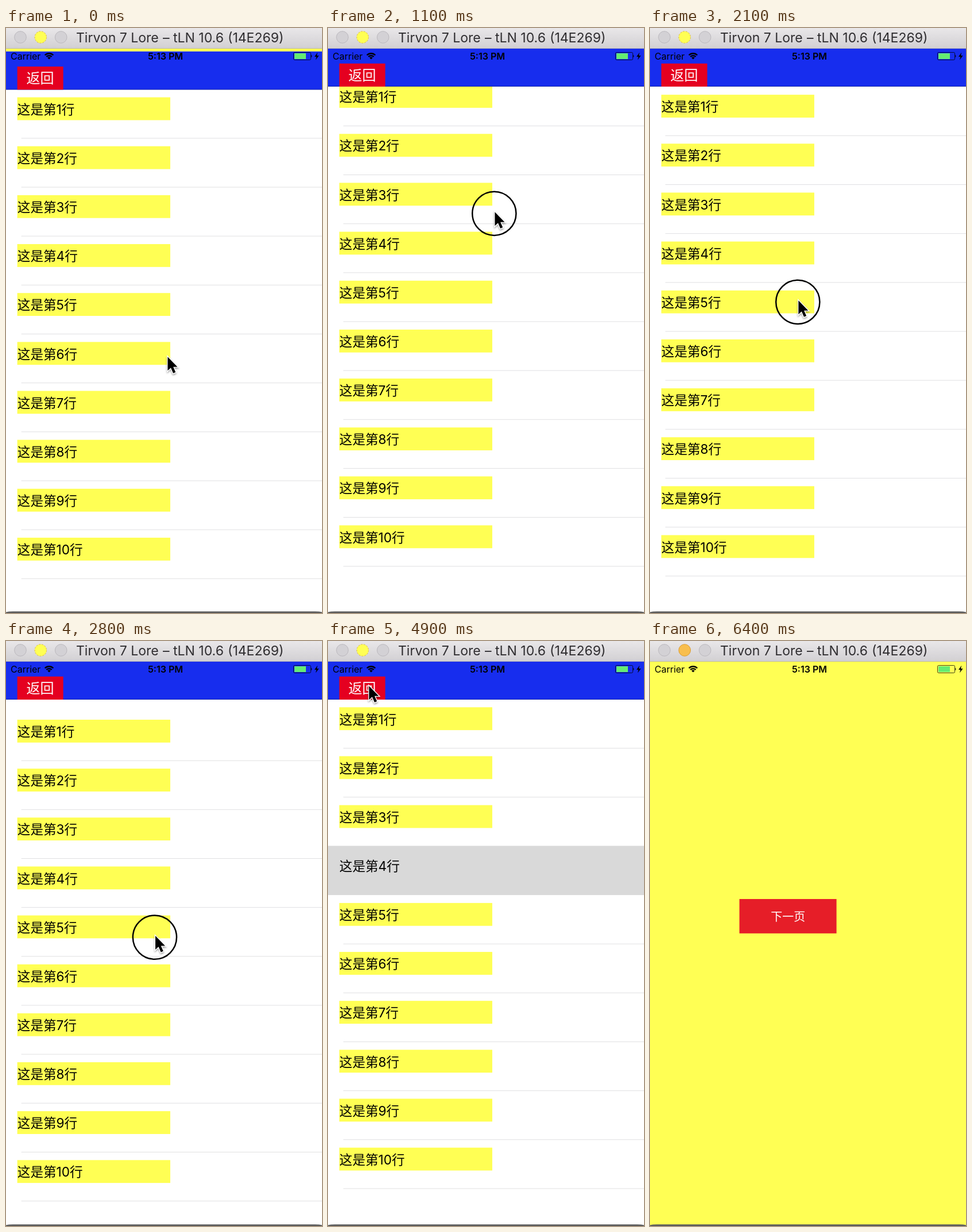
Write an HTML page that moves like this. It is 550 px wide and 1018 px high and loops after 6500 ms.

```html
<!DOCTYPE html>
<html lang="zh-CN">
<head>
<meta charset="utf-8">
<title>List demo</title>
<style>
  html, body { margin: 0; width: 100%; height: 100%; overflow: hidden; background: #fff; }
  svg { display: block; width: 100vw; height: 100vh; }
  text { font-family: Inter, "Noto Sans CJK SC", "Noto Sans CJK", sans-serif; white-space: pre; }
</style>
</head>
<body>
<svg viewBox="0 0 550 1018" xmlns="http://www.w3.org/2000/svg">
  <defs>
    <linearGradient id="bar" x1="0" y1="0" x2="0" y2="1">
      <stop offset="0" stop-color="#e9e7e9"/>
      <stop offset="1" stop-color="#d2d0d3"/>
    </linearGradient>
    <clipPath id="body"><rect y="101.5" width="550" height="920"/></clipPath>
    <filter id="soft" x="-60%" y="-40%" width="220%" height="200%">
      <feDropShadow dx="0" dy="2" stdDeviation="1.6" flood-opacity=".4"/>
    </filter>
  </defs>

  <!-- first page -->
  <rect width="550" height="1018" fill="#ffff54"/>
  <rect x="155.6" y="449" width="169" height="59.8" fill="#e61e28"/>
  <text x="240.2" y="487" font-size="20" font-weight="300" fill="#fff" text-anchor="middle">下一页</text>

  <!-- list page -->
  <g id="page">
    <rect y="35.5" width="550" height="983" fill="#fff"/>
    <g clip-path="url(#body)"><g id="rows"></g></g>
    <rect y="35.5" width="550" height="66.5" fill="#172dee"/>
    <rect y="101.3" width="550" height=".7" fill="#14208f"/>
    <rect x="19.6" y="61.8" width="80" height="40.2" fill="#e50020"/>
    <text x="59.6" y="90.8" font-size="24" font-weight="300" fill="#fff" text-anchor="middle">返回</text>
  </g>

  <!-- status bar -->
  <g font-size="16">
    <text x="8" y="55">Carrier</text>
    <text x="277.5" y="55" font-weight="600" text-anchor="middle">5:13 PM</text>
    <g fill="none" stroke="#000" stroke-width="2.3">
      <path d="M67.7 47.3A10.3 10.3 0 0 1 82.3 47.3"/>
      <path d="M70.3 50A6.6 6.6 0 0 1 79.7 50"/>
    </g>
    <path d="M75 54.6L72.2 51.8A4 4 0 0 1 77.8 51.8Z"/>
    <rect x="500.5" y="42.5" width="30" height="13" rx="2" fill="none" stroke="#000" stroke-opacity=".75"/>
    <rect x="502" y="44" width="20" height="10" fill="#65ec72"/>
    <path d="M531.3 46.6q2.4 2.4 0 4.8z"/>
    <path d="M542.3 42.5L537 50h3.4l-1.4 5.5L544.6 48h-3.6z"/>
  </g>

  <!-- window frame -->
  <rect width="550" height="35" fill="url(#bar)"/>
  <rect y="35" width="550" height=".9" fill="#b4b1b8"/>
  <g fill="#d3d1d5" stroke="#bbb8bd">
    <circle cx="25" cy="16" r="10.3"/>
    <circle id="light" cx="60.3" cy="16" r="10.3"/>
    <circle cx="95.7" cy="16" r="10.3"/>
  </g>
  <text y="25" font-size="23" fill="#2f2d30"><tspan x="122">Tirvon 7 Lore</tspan><tspan x="273">–</tspan><tspan x="291">tLN 10.6</tspan><tspan x="386">(14E269)</tspan></text>
  <path d="M0 1018V1016.5Q4 1015.3 12 1015.3H538Q546 1015.3 550 1016.5V1018Z" fill="#5c5c5c"/>

  <!-- pointer -->
  <g id="pointer">
    <circle id="ring" cx="-.7" cy="2.8" r="38.1" fill="none" stroke="#000" stroke-width="2.5"/>
    <path d="M.4 .3V24.2L5.9 19.2 10 28.8 14.2 27 10.1 17.7H17.4Z" stroke="#fff" stroke-width="2.6"
          paint-order="stroke" filter="url(#soft)"/>
  </g>
</svg>
<script>
const LOOP = 6500, STEP = 100, ROW = 85.15, TOP = 101.5, VIEW = 913;
const $ = id => document.getElementById(id);

const add = (parent, tag, attrs, text) => {
  const el = document.createElementNS('http://www.w3.org/2000/svg', tag);
  for (const k in attrs) el.setAttribute(k, attrs[k]);
  if (text) el.textContent = text;
  return parent.appendChild(el);
};

const rows = Array.from({ length: 10 }, (_, i) => {
  const g = add($('rows'), 'g', { transform: `translate(0 ${TOP + i * ROW})` });
  const line = add(g, 'rect', { x: 26.6, y: ROW - .6, width: 524, height: 1, fill: '#e0e0e2' });
  const label = add(g, 'rect', { x: 19.6, y: 13.8, width: 266.3, height: 39.8, fill: '#ffff54' });
  const grey = add(g, 'rect', { y: -.5, width: 550, height: ROW + .5, fill: '#d9d9d9' });
  add(g, 'text', { x: 19.8, y: 43, 'font-size': 22.6 }, `这是第${i + 1}行`);
  return { line, label, grey };
});

// time, x, y of the pointer tip
const path = [
  [0, 281, 572], [250, 281, 572], [850, 290, 350], [1100, 290, 320],
  [1500, 263, 703], [1750, 263, 703], [2100, 258, 474], [2600, 262, 360],
  [2950, 258, 612], [3250, 256, 650], [3600, 256, 650], [3950, 240, 395],
  [4200, 240, 395], [4800, 71, 78], [5200, 71, 78], [5600, -60, 110]
];
const presses = [[850, 1500], [2050, 2950], [3300, 3450], [4000, 4150], [5000, 5100]];

const pointerAt = t => {
  const i = path.findIndex(p => p[0] > t);
  if (i < 0) return path[path.length - 1].slice(1);
  const a = path[i - 1], b = path[i];
  const u = (t - a[0]) / (b[0] - a[0]), e = u * u * (3 - 2 * u);
  return [a[1] + (b[1] - a[1]) * e, a[2] + (b[2] - a[2]) * e];
};

// overscroll resistance and critically damped return
const rubber = d => Math.sign(d) * VIEW * (1 - 1 / (Math.abs(d) * .55 / VIEW + 1));
const settle = (ms, rate) => (1 + rate * ms / 1000) * Math.exp(-rate * ms / 1000);

const scrollAt = (t, y) => {
  if (t < 850) return 0;
  if (t < 1500) return rubber(y - 350);
  if (t < 2100) return rubber(353) * settle(t - 1500, 12);
  if (t < 2950) return rubber(y - 472.5);
  const s = rubber(139.5) * settle(t - 2950, 13.5);
  return s < .5 ? 0 : s;
};

const slideAt = t => {
  if (t < 300) return 5.3 * Math.exp(-t / 50);
  return t < 5050 ? 0 : 983 * (1 - settle(t - 5050, 16));
};

const selectedAt = t => t < 3350 ? 0 : t < 4000 ? 7 : 4;
const show = (el, on) => el.setAttribute('visibility', on ? 'visible' : 'hidden');

function draw(t) {
  const [x, y] = pointerAt(t), sel = selectedAt(t);
  $('pointer').setAttribute('transform', `translate(${x} ${y})`);
  $('pointer').setAttribute('display', t < 5600 ? 'inline' : 'none');
  show($('ring'), presses.some(([a, b]) => t >= a && t < b));
  $('rows').setAttribute('transform', `translate(0 ${scrollAt(t, y)})`);
  $('page').setAttribute('transform', `translate(0 ${slideAt(t)})`);
  $('page').setAttribute('display', t < 5600 ? 'inline' : 'none');
  rows.forEach((r, i) => {
    const on = i + 1 === sel;
    show(r.grey, on);
    show(r.label, !on);
    show(r.line, !on && i + 2 !== sel);
  });
  const late = t >= 5700;
  $('light').setAttribute('fill', late ? '#f8be4d' : '#ffff54');
  $('light').setAttribute('stroke', late ? '#db9d34' : '#dcbc4c');
  $('light').setAttribute('stroke-dasharray', late ? 'none' : '3 2');
}

const start = performance.now();
function tick() {
  const t = (performance.now() - start) % LOOP;
  draw(Math.floor(t / STEP) * STEP);
  requestAnimationFrame(tick);
}
draw(0);
requestAnimationFrame(tick);
</script>
</body>
</html>
```
